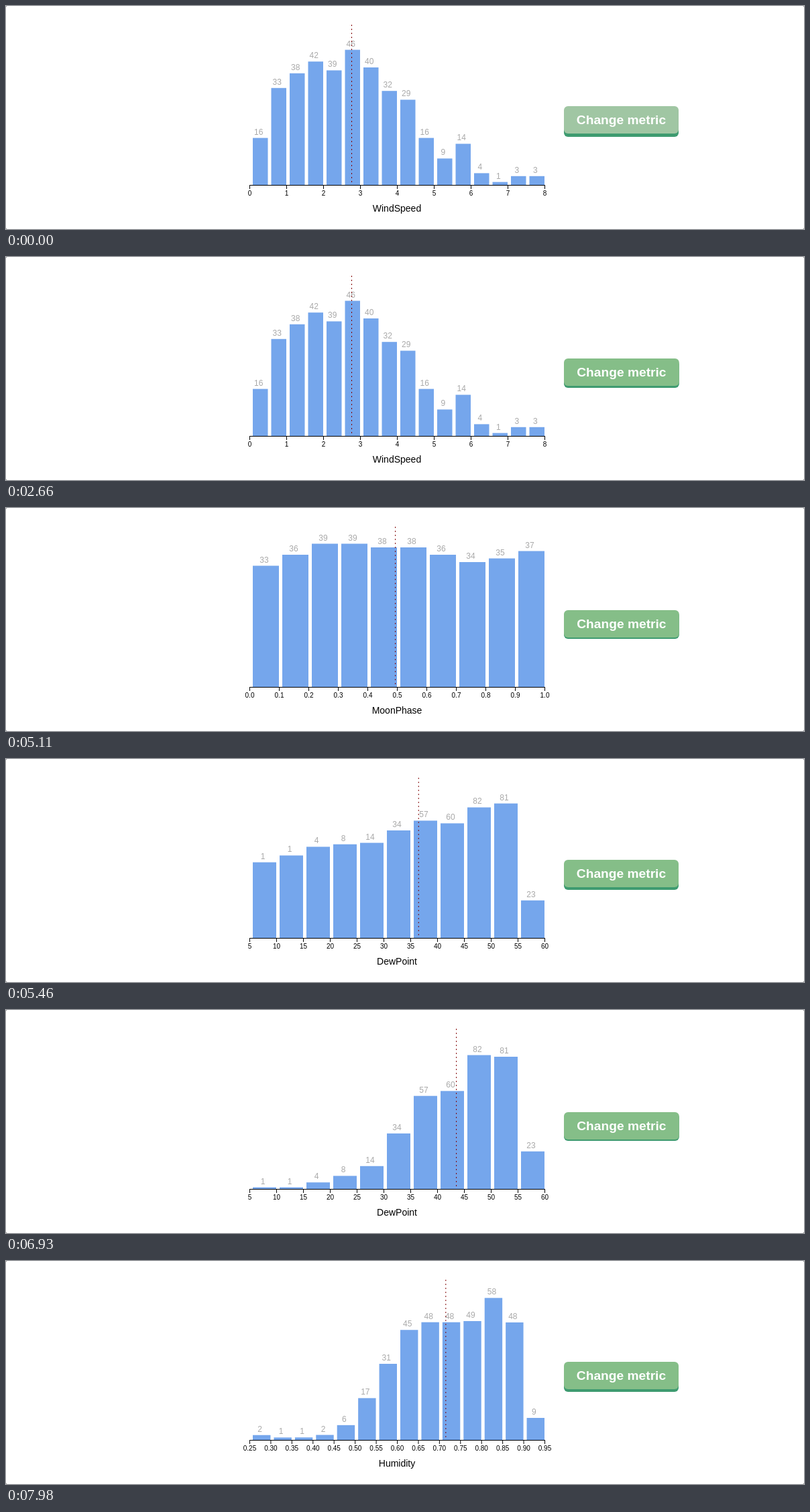
These frames come from a looping animation (1190x334 px, 8 s). An HTML page:

```html
<!DOCTYPE html>
<html lang="en">
<head>
<meta charset="utf-8">
<title>Histogram</title>
<style>
  html, body { margin: 0; width: 100%; height: 100%; overflow: hidden; background: #777; }
  svg { display: block; width: 1190px; height: 334px; background: #fff; border-radius: 2px; }
  text { font-family: "Liberation Sans", Arial, sans-serif; text-anchor: middle; }
  .bar { fill: #75a6ec; }
  .count { font-size: 12px; fill: #a9a9a9; }
  .axis { stroke: #000; fill: none; }
  .tick { font-size: 10px; }
  .name { font-size: 14px; }
  .mean { stroke: maroon; stroke-dasharray: 2 4; }
  .shade { fill: #3e9b70; }
  .label { font-size: 19.2px; font-weight: bold; fill: #fff; }
</style>
</head>
<body>
<svg id="stage" viewBox="0 0 1190 334"></svg>
<script>
const LOOP = 8000, STEP = 70;
const LEFT = 363, BASE = 268, W = 440, H = 220, GAP = 5;

// ticks: [first, step, intervals, decimals]
const metrics = [
  { name: 'WindSpeed', max: 50, mean: 515.5, ticks: [0, 1, 8, 0],
    bins: [16, 33, 38, 42, 39, 46, 40, 32, 29, 16, 9, 14, 4, 1, 3, 3] },
  { name: 'MoonPhase', max: 40, mean: 580.6, ticks: [0, 0.1, 10, 1],
    bins: [33, 36, 39, 39, 38, 38, 36, 34, 35, 37] },
  { name: 'DewPoint', max: 90, mean: 671.6, ticks: [5, 5, 11, 0],
    bins: [1, 1, 4, 8, 14, 34, 57, 60, 82, 81, 23] },
  { name: 'Humidity', max: 60, mean: 655.6, ticks: [0.25, 0.05, 14, 2],
    bins: [2, 1, 1, 2, 6, 17, 31, 45, 48, 48, 49, 58, 48, 9] }
];
const HOVER = 1440;
const presses = [[2640, 2805], [5065, 5208], [6885, 7068]]; // [down, up]

const mix = (a, b, k) => a + (b - a) * k;

// CSS ease-out: cubic-bezier(0, 0, .58, 1), solved by bisection
function easeOut(x) {
  if (x <= 0) return 0;
  if (x >= 1) return 1;
  let lo = 0, hi = 1;
  for (let i = 0; i < 24; i++) {
    const s = (lo + hi) / 2;
    if (1.74 * s * s * (1 - s) + s ** 3 < x) lo = s; else hi = s;
  }
  return 3 * lo * lo - 2 * lo ** 3;
}

const rect = (cls, x, y, w, h, more = '') =>
  `<rect class="${cls}" x="${x}" y="${y}" width="${w}" height="${h}" ${more}/>`;
const text = (cls, x, y, str) => `<text class="${cls}" x="${x}" y="${y}">${str}</text>`;

function drawBars(now, before, k) {
  const size = W / now.bins.length;
  return now.bins.map((n, i) => {
    const end = n / now.max * H;
    const start = i < before.bins.length ? before.bins[i] / before.max * H : end;
    const h = mix(start, end, k), x = LEFT + i * size;
    return rect('bar', x + GAP, BASE - h, size - GAP, h) +
      text('count', x + size / 2, BASE - h - 5, n);
  }).join('');
}

function drawAxis({ name, ticks: [first, step, count, decimals] }) {
  let path = `M${LEFT + 0.5} ${BASE + 0.5}h${W}`, labels = '';
  for (let i = 0; i <= count; i++) {
    const x = LEFT + 0.5 + i * W / count;
    path += `M${x} ${BASE}v6`;
    labels += text('tick', x, BASE + 16.1, (first + i * step).toFixed(decimals));
  }
  return `<path class="axis" d="${path}"/>` + labels + text('name', LEFT + W / 2, BASE + 40, name);
}

function drawButton(t) {
  const hover = easeOut((t - HOVER) / 300);
  let press = 0;
  for (const [down, up] of presses)
    press += easeOut((t - down) / 100) - easeOut((t - up) / 100);
  const drop = hover + 3 * press, y = 150 + drop;
  const w = press > 0 ? 171.8 : 171;
  const fill = [[160, 133], [198, 190], [163, 136]].map(([a, b]) => Math.round(mix(a, b, hover)));
  return rect('shade', 832, y + 5 - drop, w, 41, 'rx="6"') +
    rect('face', 832, y, w, 41, `rx="6" fill="rgb(${fill})"`) +
    text('label', 832 + w / 2, y + 27, 'Change metric');
}

function draw(t) {
  const clicks = presses.filter(([, up]) => t >= up).length;
  const now = metrics[clicks], before = metrics[Math.max(0, clicks - 1)];
  const k = clicks ? easeOut((t - presses[clicks - 1][1]) / 1000) : 1;
  const x = mix(before.mean, now.mean, k);
  stage.innerHTML = drawBars(now, before, k) +
    `<line class="mean" x1="${x}" x2="${x}" y1="28" y2="${BASE}"/>` +
    drawAxis(now) + drawButton(t);
}

const stage = document.getElementById('stage');
const begin = performance.now();
let shown = -1;

function frame() {
  const t = (performance.now() - begin) % LOOP;
  const tick = Math.floor((t + 4) / STEP);
  if (tick !== shown) draw((shown = tick) * STEP);
  requestAnimationFrame(frame);
}
frame();
</script>
</body>
</html>
```
